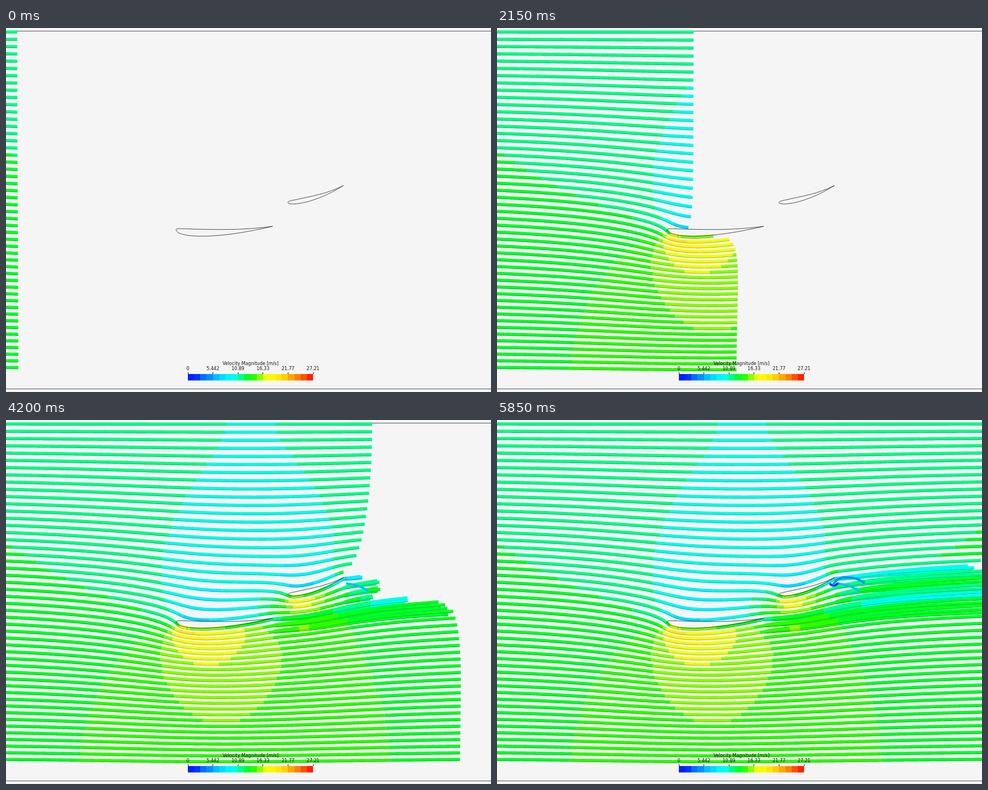
Write an HTML page with a canvas that moves like this. It is 864 px wide and 648 px high and loops after 5900 ms.

```html
<!DOCTYPE html>
<html lang="en">
<head>
<meta charset="utf-8">
<title>Flow around two foils</title>
<style>
html, body { margin: 0; width: 864px; height: 648px; overflow: hidden; background: #f5f5f5; }
canvas { display: block; }
</style>
</head>
<body>
<canvas id="stage" width="864" height="648"></canvas>
<script>
const ctx = document.getElementById('stage').getContext('2d');
const LOOP = 5900, TICK = 50;
const TOP = 5.5, BOTTOM = 642.5, K = Math.PI / (BOTTOM - TOP);
const SPEED = 0.168;        // free stream, px per ms
const BINS_PER_UNIT = 9.22; // colour bins per unit of relative speed
const HEAD_START = 125;     // ms flown before the loop begins
const CORE = (K * 4) ** 2 / 2;
const DS = 3, END = 870, COUNT = 49;

const SCALE = ['#0020ff', '#0034ff', '#0070ff', '#0090ff', '#00c0ff', '#00dcff', '#00f4ff',
  '#00ffe8', '#00ff88', '#00ff28', '#28ff00', '#88ff00', '#f0ff00', '#fff800', '#ffe800',
  '#ffd000', '#ffa800', '#ff8000', '#ff5000', '#ff2000'];

// Height of line i far upstream; it also names the streamline
const label = i => 7 + 12.404 * i;

// Lower side of each foil as a cubic curve, its upper side as path data,
// and the streamline that meets its nose
const foils = [
  { lower: [[303, 359], [303, 372], [365, 379], [475, 353]],
    upper: 'C430 359 390 360 320 357.5C308 357 303 357 303 359Z',
    label: label(23.85), panels: 26, deficit: 0.14 },
  { lower: [[502, 310.5], [503, 317], [548, 314], [601, 280.5]],
    upper: 'C570 296 545 299 512 306.5C505 308 502 309 502 310.5Z',
    label: label(19.85), panels: 17, deficit: 0.2 }
];

function bezier(p, t) {
  const s = 1 - t, w = [s * s * s, 3 * s * s * t, 3 * s * t * t, t * t * t];
  return [0, 1].map(axis => w.reduce((sum, f, n) => sum + f * p[n][axis], 0));
}

// A vortex between the channel walls
function influence(x, y, vortex) {
  const X = K * (x - vortex.x), a = K * (y - vortex.y), b = K * (y + vortex.y - 2 * TOP);
  const ex = Math.exp(X), cosh = (ex + 1 / ex) / 2;
  const near = cosh - Math.cos(a) + CORE, mirror = cosh - Math.cos(b);
  return {
    psi: Math.log(near / mirror),
    u: K * (Math.sin(a) / near - Math.sin(b) / mirror),
    v: K * (ex - 1 / ex) / 2 * (1 / mirror - 1 / near)
  };
}

function solve(m, rhs) {
  const n = rhs.length;
  for (let c = 0; c < n; c++) {
    let p = c;
    for (let r = c + 1; r < n; r++) if (Math.abs(m[r][c]) > Math.abs(m[p][c])) p = r;
    [m[c], m[p]] = [m[p], m[c]];
    [rhs[c], rhs[p]] = [rhs[p], rhs[c]];
    for (let r = c + 1; r < n; r++) {
      const f = m[r][c] / m[c][c];
      for (let k = c; k < n; k++) m[r][k] -= f * m[c][k];
      rhs[r] -= f * rhs[c];
    }
  }
  for (let c = n - 1; c >= 0; c--) {
    for (let k = c + 1; k < n; k++) rhs[c] -= m[c][k] * rhs[k];
    rhs[c] /= m[c][c];
  }
  return rhs;
}

// Vortices along the foils, strong enough to make each foil a streamline
const vortices = foils.flatMap(foil => Array.from({ length: foil.panels }, (_, n) => {
  const [x, y] = bezier(foil.lower, Math.sqrt(n / (foil.panels - 1)));
  return { x, y, label: foil.label };
}));
const strengths = solve(
  vortices.map(c => vortices.map(v => influence(c.x, c.y, v).psi)),
  vortices.map(c => c.label - c.y));

function flow(x, y) {
  let psi = y, u = 1, v = 0;
  vortices.forEach((vortex, n) => {
    const part = influence(x, y, vortex), g = strengths[n];
    psi += g * part.psi;
    u += g * part.u;
    v += g * part.v;
  });
  return { psi, u, v, q: Math.hypot(u, v) };
}

const clamp = (v, lo, hi) => Math.min(hi, Math.max(lo, v));

// Share of the speed left behind a foil for the streamlines that touch it
function wake(name, x) {
  return foils.reduce((left, foil) => {
    const nose = foil.lower[0][0], tail = foil.lower[3][0], half = (tail - nose) / 2;
    const grown = clamp((x - nose - half) / half, 0, 1);
    return left * (1 - foil.deficit * grown * Math.exp(-(((name - foil.label - 2) / 9) ** 2)));
  }, 1);
}

// Follow a streamline; every point keeps its arrival time and colour bin
function trace(name) {
  let x = 0, y = name, t = 0;
  for (let n = 0; n < 6; n++) {
    const f = flow(x, y);
    y -= (f.psi - name) / f.u;
  }
  const points = [];
  let f = flow(x, y);
  for (let n = 0; n < 420 && x < END; n++) {
    const q = Math.max(0.2, f.q * wake(name, x));
    points.push({ x, y, t, bin: clamp(Math.floor(q * BINS_PER_UNIT), 0, 17) });
    const mid = flow(x + f.u / f.q * DS / 2, y + f.v / f.q * DS / 2);
    x += mid.u / mid.q * DS;
    y += mid.v / mid.q * DS;
    t += DS / (SPEED * q);
    f = flow(x, y);
    // pull back onto the streamline
    const off = clamp((f.psi - name) / Math.max(0.3, f.q * f.q), -1.5, 1.5);
    x += f.v * off;
    y -= f.u * off;
  }
  return points;
}

let seed = 7;
const random = () => (seed = seed * 16807 % 2147483647) / 2147483647;

// A strand that leaves its streamline behind the foil and fans out
function strand(points, tail, side) {
  const spread = side * (4 + 3 * random()), lag = 100 * random();
  return points.filter(p => p.x > tail).map(p => {
    const fan = (p.x - tail) / (END - tail);
    return { ...p, y: p.y + spread * Math.sqrt(fan), t: p.t + lag * Math.sqrt(fan) };
  });
}

const lines = Array.from({ length: COUNT }, (_, i) => trace(label(i)));
const strands = [];
for (let i = 20; i < 27; i++) {
  const tail = foils[i < 24 ? 1 : 0].lower[3][0];
  for (const side of [-1, 1]) strands.push(strand(lines[i], tail, side));
}

function stroke(color, width) {
  ctx.strokeStyle = color;
  ctx.lineWidth = width;
  ctx.stroke();
}

function drawLine(points, t) {
  let count = points.findIndex(p => p.t > t);
  if (count === 0 || !points.length) return;
  let shown = points;
  if (count > 0) {
    const a = points[count - 1], b = points[count], f = (t - a.t) / (b.t - a.t);
    shown = points.slice(0, count);
    shown.push({ x: a.x + (b.x - a.x) * f, y: a.y + (b.y - a.y) * f, bin: a.bin });
  }
  for (let from = 0; from < shown.length - 1;) {
    let to = from + 1;
    while (to < shown.length - 1 && shown[to].bin === shown[from].bin) to++;
    ctx.beginPath();
    for (let k = from; k <= to; k++) ctx.lineTo(shown[k].x, shown[k].y);
    stroke(SCALE[shown[from].bin], 5.6);
    from = to;
  }
  ctx.beginPath();
  for (const p of shown) ctx.lineTo(p.x, p.y + 2.2);
  stroke('rgba(0,0,0,.22)', 1.2);
}

// Slow curls behind the upper foil: start, colour bin, path
const eddies = [
  [4000, 4, new Path2D('M606 291C620 292 632 296 645 304')],
  [4600, 1, new Path2D('M593 291C597 297 604 295 608 290')],
  [5250, 3, new Path2D('M598 294C606 282 612 280 622 280S645 283 655 290')]
];
function drawEddies(t) {
  for (const [start, bin, path] of eddies) {
    if (t < start) continue;
    ctx.setLineDash([clamp((t - start) / 200, 0, 1) * 70, 200]);
    ctx.strokeStyle = SCALE[bin];
    ctx.lineWidth = 4;
    ctx.stroke(path);
  }
  ctx.setLineDash([]);
}

const outlines = foils.map(({ lower, upper }) =>
  new Path2D(`M${lower[0]}C${lower.slice(1).join(' ')}${upper}`));

function drawLegend() {
  const left = 324, width = 223, bin = width / SCALE.length;
  SCALE.forEach((color, n) => {
    const x = Math.round(left + n * bin);
    ctx.fillStyle = color;
    ctx.fillRect(x, 616, Math.round(left + (n + 1) * bin) - x, 11.5);
  });
  ctx.fillStyle = '#111';
  ctx.font = '8px "DejaVu Sans", sans-serif';
  ctx.textAlign = 'center';
  ctx.fillText('Velocity Magnitude [m/s]', 435.5, 600);
  ['0', '5.442', '10.89', '16.33', '21.77', '27.21'].forEach((text, n) => {
    const x = left + n * width / 5;
    ctx.fillText(text, x, 609);
    ctx.fillRect(Math.floor(x), 613, 1, 3);
  });
}

function draw(t) {
  ctx.fillStyle = '#f5f5f5';
  ctx.fillRect(0, 0, 864, 648);
  ctx.fillStyle = '#555';
  ctx.fillRect(0, 5, 864, 1);
  ctx.fillRect(0, 642, 864, 1);
  for (const points of [...strands, ...lines]) drawLine(points, t + HEAD_START);
  drawEddies(t);
  ctx.strokeStyle = '#222';
  ctx.lineWidth = 0.8;
  for (const path of outlines) ctx.stroke(path);
  drawLegend();
}

const begin = performance.now();
function frame() {
  const t = Math.max(0, performance.now() - begin) % LOOP;
  draw(Math.floor(t / TICK) * TICK);
  requestAnimationFrame(frame);
}
frame();
</script>
</body>
</html>
```
